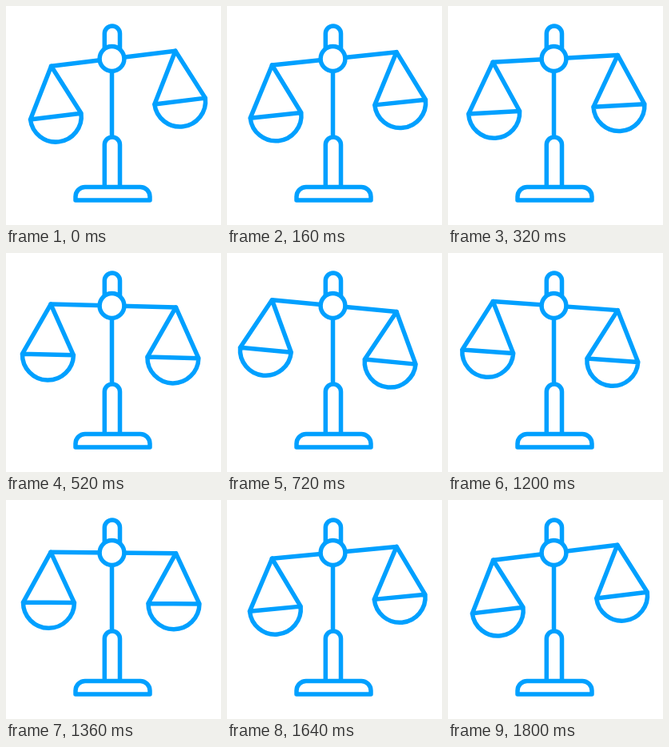
An HTML page that plays this animation: 269 by 274 pixels, repeating every 1.84 s.

```html
<!DOCTYPE html>
<html lang="en">
<head>
<meta charset="utf-8">
<title>Balance scales</title>
<style>
  html, body { margin: 0; width: 100%; height: 100%; overflow: hidden; background: #fff; }
  svg { display: block; width: 100%; height: 100%; }
</style>
</head>
<body>
<svg viewBox="0 0 269 274" fill="none" stroke="#00a0ff" stroke-width="5.5" stroke-linejoin="round" stroke-linecap="round">
  <defs>
    <!-- strings and bowl, hung from the origin -->
    <path id="pan" d="M0 0L-34 63H30ZM-34 63A32 32 0 0 0 30 63"/>
  </defs>
  <path d="M123.3 56V34.5a9.6 9.6 0 0 1 19.2 0V56"/>
  <path d="M132.5 80V161"/>
  <path d="M123.3 225V173.5a9.6 9.6 0 0 1 19.2 0V225"/>
  <path d="M87 243V238.5a12 12 0 0 1 12-12H168a12 12 0 0 1 12 12V243Z"/>
  <g id="beam">
    <path d="M56 66H212.5"/>
    <use href="#pan" x="56" y="66"/>
    <use href="#pan" x="212.5" y="66"/>
  </g>
  <circle cx="132.5" cy="66" r="15.4" fill="#fff"/>
</svg>
<script>
const LOOP = 1840, STEP = 40, SWING = 7;
const beam = document.getElementById('beam');
const start = performance.now();

function draw() {
  const elapsed = (performance.now() - start) % LOOP;
  const t = Math.floor(elapsed / STEP) * STEP;
  const angle = -SWING * Math.cos(2 * Math.PI * t / LOOP);
  beam.setAttribute('transform', `rotate(${angle} 132.5 66)`);
  requestAnimationFrame(draw);
}
draw();
</script>
</body>
</html>
```
